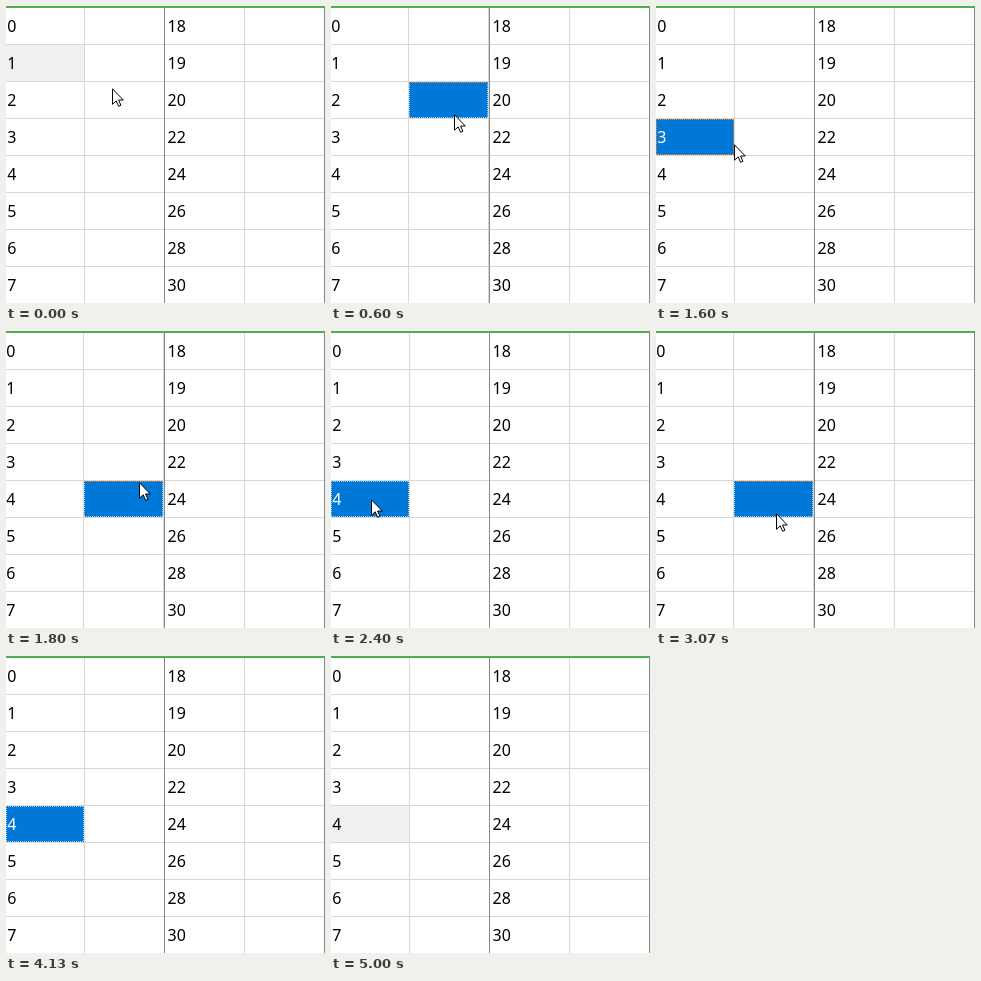
An HTML page that plays this animation: 319x297 px, repeating every 5130 ms.

```html
<!DOCTYPE html>
<html lang="en">
<head>
<meta charset="utf-8">
<style>
  html, body { margin: 0; width: 100%; height: 100%; overflow: hidden; background: #fff; }
  svg { display: block; }
  text { font: 16px "Noto Sans", "Open Sans", sans-serif; }
  .dots { fill: none; stroke-dasharray: 1 1; }
</style>
</head>
<body>
<svg width="319" height="297" viewBox="0 0 319 297">
  <g id="left">
    <rect id="cell" height="36" shape-rendering="crispEdges"/>
    <g id="leftGrid"></g>
  </g>
  <g id="right"></g>
  <g id="focus" shape-rendering="crispEdges">
    <path id="sides" class="dots"/>
    <path id="top" class="dots"/>
  </g>
  <path id="cursor" fill="#fff" stroke="#000" stroke-linejoin="round"
        d="M.5 .8V16.3L4.2 12.8L6.6 18.3L8.9 17.3L6.6 12H11.3Z"/>
</svg>
<script>
const LOOP = 5130, ROW = 37, TOP = 2;
const BLUE = '#0078d7', ORANGE = '#ff8728', PALE = '#a8d0f5';
const TICK = { press: 6, release: 53, blur: 75 };
const $ = id => document.getElementById(id);

// Pointer tip: tick (1/15 s), x, y
const path = [
  [0, 106, 82], [3, 103, 58], [6, 103, 58], [7, 106, 69], [9, 123, 108],
  [12, 128, 124], [14, 116, 126], [17, 61, 127], [20, 42, 130], [22, 42, 130],
  [27, 133, 151], [28, 133, 151], [30, 131, 158], [36, 40, 168], [40, 40, 168],
  [46, 120, 182], [49, 120, 182], [53, 20, 178], [54, 20, 178], [55, 19, 178],
  [57, 19, 178], [58, 18, 184], [61, 157, 284], [62, 175, 320], [77, 175, 320]
];

function add(parent, tag, attrs, content = '') {
  const el = document.createElementNS('http://www.w3.org/2000/svg', tag);
  set(el, attrs);
  el.textContent = content;
  return parent.appendChild(el);
}

function set(el, attrs) {
  for (const key in attrs) el.setAttribute(key, attrs[key]);
}

function bar(parent, x, y, width, height, fill) {
  return add(parent, 'rect', { x, y, width, height, fill });
}

function table(parent, x, width, textX, values) {
  const labels = values.map((value, row) => {
    bar(parent, x, TOP + ROW * (row + 1) - 1, width, 1, '#d8d8d8');
    return add(parent, 'text', { x: textX, y: 26 + ROW * row }, value);
  });
  return labels;
}

const labels = table($('leftGrid'), 0, 159, 1.2, [0, 1, 2, 3, 4, 5, 6, 7]);
bar($('leftGrid'), 78, TOP, 1, 295, '#d8d8d8');
bar($('leftGrid'), 158, TOP, 1, 295, '#d8d8d8');
table($('right'), 159, 159, 161.5, [18, 19, 20, 22, 24, 26, 28, 30]);
bar($('right'), 238, TOP, 1, 295, '#d8d8d8');
bar($('right'), 158, TOP, 1, 295, '#828790');
bar($('right'), 318, TOP, 1, 295, '#828790');
bar($('right'), 0, 0, 319, TOP, '#4caf50');

function pointerAt(tick) {
  const i = path.findIndex(key => key[0] > tick);
  const [t0, x0, y0] = path[i - 1], [t1, x1, y1] = path[i];
  const k = (tick - t0) / (t1 - t0);
  return [Math.round(x0 + (x1 - x0) * k), Math.round(y0 + (y1 - y0) * k)];
}

function selectionAt(tick) {
  if (tick < TICK.press) return [1, 0];
  const [x, y] = pointerAt(Math.min(tick, TICK.release));
  return [Math.floor((y - TOP) / ROW), x > 78 ? 1 : 0];
}

function render(ms) {
  const tick = Math.min(76, Math.floor((ms + 4) * 0.015));
  const [row, col] = selectionAt(tick);
  const active = tick >= TICK.press && tick < TICK.blur;

  // Selecting the second column scrolls the table by one pixel.
  set($('left'), { transform: `translate(${-col} 0)` });
  const x = col ? 79 : 0, y = TOP + ROW * row, width = col ? 79 : 78;
  set($('cell'), { x, y, width, fill: active ? BLUE : '#f0f0f0' });
  labels.forEach((label, i) =>
    set(label, { fill: active && !col && i === row ? '#fff' : '#000' }));

  const odd = row % 2 === 1;
  const l = x - col + 0.5, r = l + width - 1, t = y + 0.5, b = t + 35;
  set($('focus'), { visibility: active ? 'visible' : 'hidden' });
  set($('sides'), {
    d: `M${l} ${y}V${y + 36}M${r} ${y}V${y + 36}M${l - 0.5} ${b}H${r + 0.5}`,
    stroke: odd ? ORANGE : PALE
  });
  set($('top'), {
    d: `M${l - 0.5} ${t}H${r + 0.5}`,
    stroke: odd || col ? ORANGE : PALE
  });

  set($('cursor'), { transform: `translate(${pointerAt(tick)})` });
}

const start = performance.now();
function frame() {
  render((performance.now() - start) % LOOP);
  requestAnimationFrame(frame);
}
frame();
</script>
</body>
</html>
```
